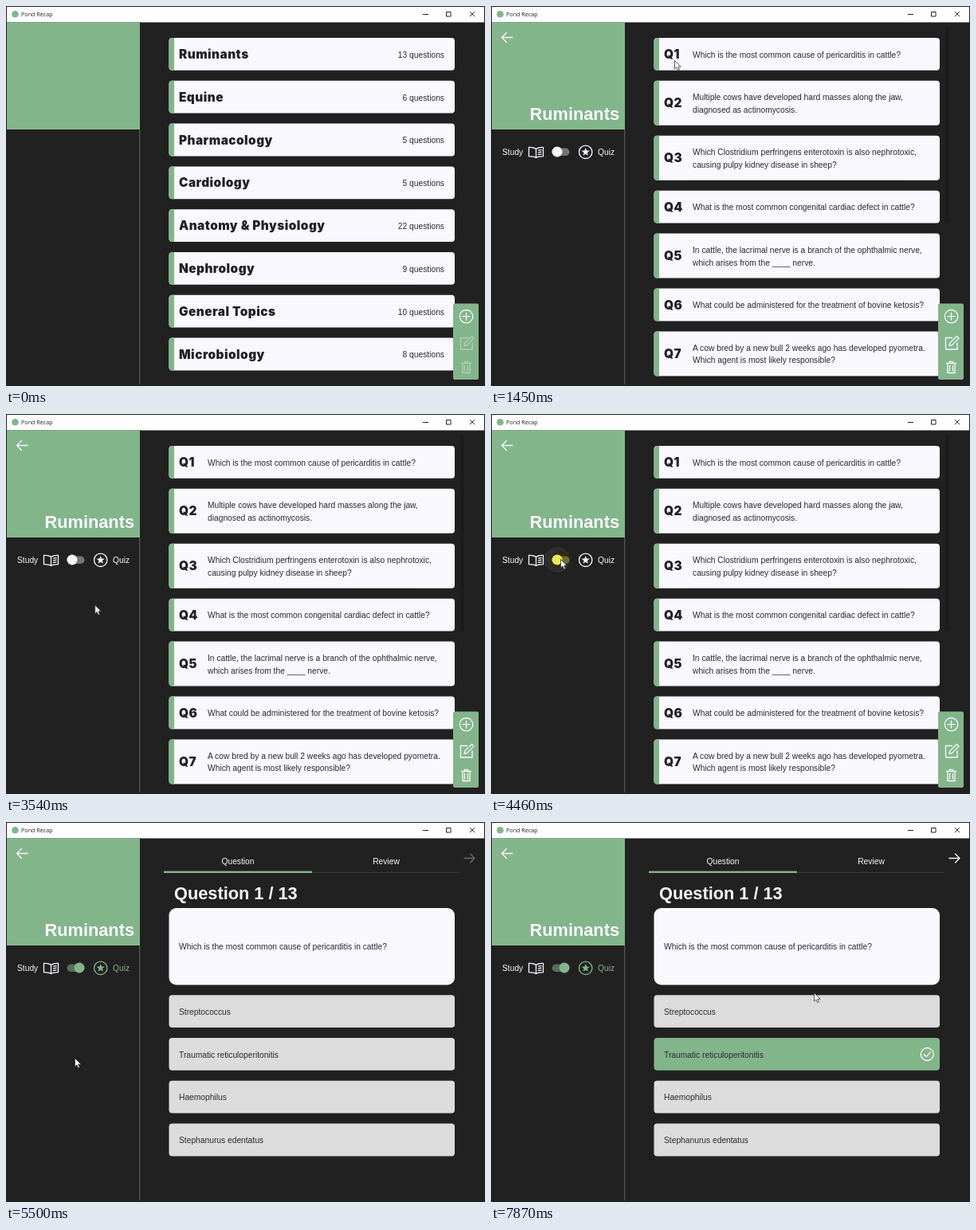
An HTML page for the animation above (8 s loop, 601 px wide and 477 px high).

```html
<!DOCTYPE html>
<html lang="en">
<head>
<meta charset="utf-8">
<title>Pond Recap</title>
<style>
html, body { margin: 0; width: 100%; height: 100%; overflow: hidden; background: #212121; }
svg { display: block; width: 601px; height: 477px; }
text { font: 10.25px "Liberation Sans", Arial, sans-serif; fill: #2a2a2e; }
.heavy { font: 900 15.3px Inter, "DejaVu Sans", sans-serif; letter-spacing: .5px; fill: #212124; }
.big { font-weight: 700; font-size: 21.75px; fill: #f9f8ff; }
.light { fill: #f9f8ff; }
.app { font: 7.2px "Open Sans", sans-serif; fill: #222; }
.line { fill: none; stroke: #f9f8ff; stroke-width: 1.3; stroke-linecap: round; stroke-linejoin: round; }
.end { text-anchor: end; }
.mid { text-anchor: middle; }
</style>
</head>
<body>
<svg id="stage" viewBox="0 0 601 477"></svg>
<script>
const LOOP = 8000, STEP = 128;
const GREEN = '#83b58b', PAPER = '#f9f8ff', DARK = '#212121';

const topics = [['Ruminants', 13], ['Equine', 6], ['Pharmacology', 5], ['Cardiology', 5],
  ['Anatomy & Physiology', 22], ['Nephrology', 9], ['General Topics', 10], ['Microbiology', 8]];
const questions = [
  ['Which is the most common cause of pericarditis in cattle?'],
  ['Multiple cows have developed hard masses along the jaw,', 'diagnosed as actinomycosis.'],
  ['Which Clostridium perfringens enterotoxin is also nephrotoxic,', 'causing pulpy kidney disease in sheep?'],
  ['What is the most common congenital cardiac defect in cattle?'],
  ['In cattle, the lacrimal nerve is a branch of the ophthalmic nerve,', 'which arises from the ____ nerve.'],
  ['What could be administered for the treatment of bovine ketosis?'],
  ['A cow bred by a new bull 2 weeks ago has developed pyometra.', 'Which agent is most likely responsible?']];
const answers = ['Streptococcus', 'Traumatic reticuloperitonitis', 'Haemophilus', 'Stephanurus edentatus'];

// Cursor moves: start, steps, from, to
const moves = [
  [260, 5, [31, 153], [204, 78]],
  [930, 2, [204, 78], [230, 68]],
  [1990, 7, [230, 68], [140, 269]],
  [2890, 2, [140, 269], [127, 277]],
  [3280, 7, [127, 277], [87, 182]],
  [4720, 5, [87, 182], [85, 284]],
  [5370, 2, [85, 284], [86, 296]],
  [6310, 7, [87, 296], [233, 294]],
  [7350, 5, [233, 294], [405, 214]]];

const esc = s => String(s).replace(/&/g, '&amp;');
const text = (x, y, s, cls = '', more = '') => `<text x="${x}" y="${y}" class="${cls}" ${more}>${esc(s)}</text>`;
const rect = (x, y, w, h, fill, r = 0, more = '') =>
  `<rect x="${x}" y="${y}" width="${w}" height="${h}" rx="${r}" fill="${fill}" ${more}/>`;
const circle = (x, y, r, more) => `<circle cx="${x}" cy="${y}" r="${r}" ${more}/>`;
const line = (d, more = '') => `<path class="line" d="${d}" ${more}/>`;
const group = (id, body, more = '') => `<g id="${id}" ${more}>${body}</g>`;

const card = (y, h) => rect(204.5, y, 358.5, h, PAPER, 4) +
  `<path fill="${GREEN}" d="M211 ${y}h-2.5a4 4 0 0 0-4 4v${h - 8}a4 4 0 0 0 4 4h2.5z"/>`;

function topicList() {
  return topics.map(([name, n], i) => {
    const y = 40 + i * 53.8;
    return card(y, 40.8) + text(217, y + 26, name, 'heavy', i ? '' : 'id="hot"') +
      text(550, y + 24.8, n + ' questions', 'end');
  }).join('');
}

function questionList() {
  let y = 40;
  return rect(570, 27, 5, 245, '#1c1c1c') + questions.map((rows, i) => {
    const h = rows.length > 1 ? 56 : 40.8, c = y + h / 2;
    const out = card(y, h) + text(217, c + 5.6, 'Q' + (i + 1), 'heavy') +
      rows.map((s, k) => text(253, c + 4.2 + (k - (rows.length - 1) / 2) * 15.4, s)).join('');
    y += h + 13;
    return out;
  }).join('');
}

function quizPage() {
  return text(291, 53, 'Question', 'light mid') + text(477, 53, 'Review', 'light mid') +
    rect(384, 63, 185, 1, '#3b3b3b') + rect(198, 61.6, 186, 2.4, GREEN) +
    line('M575 45.5h13m-5.5-5.5l5.5 5.5l-5.5 5.5', 'id="next"') +
    text(211, 96.5, 'Question 1 / 13', 'big') +
    rect(204.5, 108, 358.5, 96.5, PAPER, 9) + text(217, 160.4, questions[0][0]) +
    answers.map((s, i) => {
      const y = 217.2 + i * 53.8;
      return rect(204.5, y, 358.5, 40.8, '#dcdcdc', 4, `id="box${i}"`) +
        text(217, y + 24.6, s, '', `id="ans${i}"`);
    }).join('') +
    group('check', circle(547.3, 291.5, 8, 'class="line"') + line('M543.2 291.8l3 3l5.4-6'));
}

function starPath(x, y, r) {
  let d = '';
  for (let i = 0; i < 10; i++) {
    const a = i * Math.PI / 5, k = i % 2 ? r * .42 : r;
    d += (i ? 'L' : 'M') + (x + k * Math.sin(a)).toFixed(2) + ' ' + (y - k * Math.cos(a)).toFixed(2);
  }
  return d + 'Z';
}

function sideTools() {
  return line('M27 39.5H13.5m6-6l-6 6l6 6') + text(161, 143, 'Ruminants', 'big end') +
    text(14, 187, 'Study', 'light') +
    line('M56.5 179.5c-2.5-2-5.5-2.3-9-2.2v11.4c3.5 0 6.5.3 9 1.8c2.5-1.5 5.5-1.8 9-1.8v-11.4c-3.5-.1-6.5.2-9 2.2v11M59.5 181.2l3.6-.6M59.5 183.8l3.6-.6M59.5 186.4l3.6-.6') +
    circle(83, 183, 16, 'id="halo" fill="#fff"') +
    rect(76.5, 178.5, 22, 9.4, '#757575', 4.7, 'id="track"') +
    circle(83, 183, 6.5, 'id="knob"') +
    circle(118.7, 183.3, 8.2, 'class="line" id="ring"') +
    `<path id="star" d="${starPath(118.7, 183.4, 5.4)}"/>` +
    text(134, 187, 'Quiz', '', 'id="quizLabel"');
}

function actions() {
  return rect(561, 373.5, 32, 95.5, GREEN, 2) +
    circle(577.5, 389.7, 8.2, 'class="line"') + line('M573 389.7h9m-4.5-4.5v9') +
    group('tools',
      line('M578.5 416.5h-8v14.5h14.5v-8M575 426.5l.8-3.6l8.6-8.4l2.6 2.6l-8.5 8.5z') +
      line('M571.5 448.5h12m-10.5 0v12h9v-12m-6.5 0v-2.2h4v2.2m-4 3v6.5m4-6.5v6.5'));
}

document.getElementById('stage').innerHTML =
  rect(0, 0, 601, 477, DARK) + rect(1, 1, 599, 19.5, '#fff') +
  circle(11.5, 10.3, 4.3, `fill="${GREEN}"`) + text(19, 13, 'Pond Recap', 'app') +
  '<path d="M523 10.5h7M552.5 7.5h5.5v5.5h-5.5zM582 7.2l6 6m0-6l-6 6" fill="none" stroke="#222"/>' +
  rect(1, 20.5, 167, 134.5, GREEN) + rect(167, 155, 1.3, 320, '#555') +
  group('side', sideTools()) + group('topics', topicList()) + group('list', questionList()) +
  group('quiz', quizPage()) + group('actions', actions()) +
  circle(0, 0, 11, 'id="flash" fill="#f2ee5a" style="mix-blend-mode:multiply"') +
  group('cursor', '<path d="M.5.5v10.6l2.4-2.2l1.7 3.8l1.8-.8l-1.7-3.7h3.4z" fill="#fff" stroke="#333" stroke-width=".8"/>');

const $ = id => document.getElementById(id);
const set = (id, o) => { for (const k in o) $(id).setAttribute(k, o[k]); };
const show = (id, on) => { $(id).style.display = on ? '' : 'none'; };
const clamp = v => Math.min(1, Math.max(0, v));
const steps = (t, start, n) => t < start ? 0 : clamp((Math.floor((t - start) / STEP) + 1) / n);
const mix = (a, b, p) => `rgb(${a.map((v, i) => Math.round(v + (b[i] - v) * p))})`;
const ease = p => p * p * (3 - 2 * p);

function pointer(t) {
  let at = moves[0][2];
  moves.forEach(([start, n, a, b], i) => {
    if (t < start) return;
    const p = ease(i ? steps(t, start, n) : clamp(Math.floor((t - start) / STEP) / (n - 1)));
    at = a.map((v, k) => v + (b[k] - v) * p);
  });
  return at;
}

function draw(t) {
  const opened = t >= 1450, quiz = t >= 4590, done = t >= 7350;
  const [x, y] = pointer(t);
  show('side', opened);
  show('topics', !opened);
  show('list', opened && !quiz);
  show('quiz', quiz);
  show('actions', !quiz);
  show('cursor', t >= 260);
  set('cursor', { transform: `translate(${x.toFixed(2)} ${y.toFixed(2)})` });
  set('tools', { opacity: opened ? 1 : .38 });
  $('hot').style.fill = mix([33, 33, 36], [146, 190, 154], steps(t, 1060, 3));

  const slide = steps(t, 4720, 2), tint = quiz ? GREEN : PAPER;
  const kx = 83 + 9 * slide;
  set('knob', { cx: kx, fill: quiz ? GREEN : PAPER });
  set('track', { fill: quiz ? '#52705a' : '#757575' });
  set('halo', { cx: kx, opacity: t < 4460 ? 0 : quiz ? .16 * (1 - steps(t, 4850, 4)) : .06 });
  $('ring').style.stroke = tint;
  set('star', { fill: tint });
  $('quizLabel').style.fill = tint;

  const hover = done ? 0 : steps(t, 6830, 3);
  set('box1', { fill: done ? GREEN : mix([220, 220, 220], [224, 224, 224], hover) });
  $('ans1').style.fill = mix([42, 42, 46], [92, 92, 94], hover);
  show('check', done);
  $('next').style.stroke = done ? PAPER : '#6c6c6c';

  show('flash', (t >= 4460 && t < 4590) || (t >= 7220 && t < 7350));
  set('flash', { cx: x, cy: y + 1 });
}

function tick() {
  draw(performance.now() % LOOP);
  requestAnimationFrame(tick);
}
tick();
</script>
</body>
</html>
```
